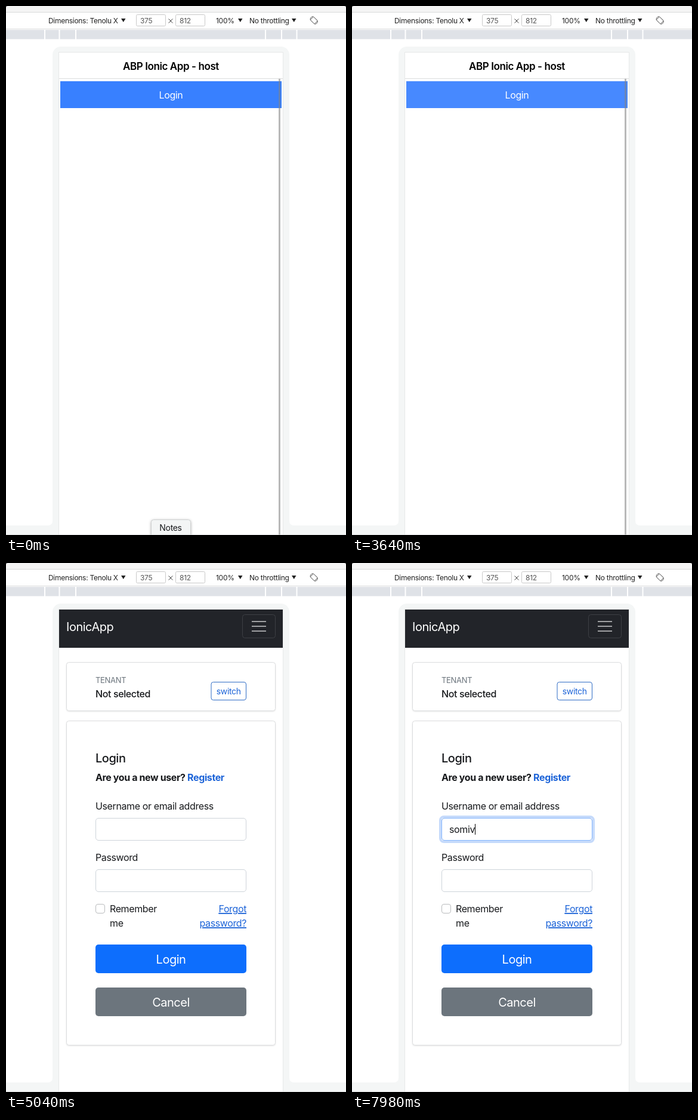
Recreate the animation shown at these times as an HTML page. Size 570 by 886 pixels, loop 8000 ms.

```html
<!DOCTYPE html>
<html lang="en">
<head>
<meta charset="utf-8">
<title>Mobile login</title>
<style>
html, body { margin: 0; width: 100%; height: 100%; overflow: hidden; background: #fff; }
svg { display: block; }
text { font-family: Inter, "Liberation Sans", sans-serif; font-size: 16px; letter-spacing: -.024em; fill: #17191c; }
.ui { font-size: 12px; fill: #222; }
.mid { text-anchor: middle; }
.end { text-anchor: end; }
.white { fill: #fff; }
.big { font-size: 20px; }
.link { fill: #1d64d8; }
.bold { font-weight: 700; }
.field { fill: #fff; stroke: #ced4da; }
.box { fill: #fff; stroke: #c9c9c9; }
.card { fill: #fff; stroke: #dcdddf; filter: drop-shadow(0 1px 1px rgba(0,0,0,.1)); }
.float { filter: drop-shadow(0 1px 2px rgba(0,0,0,.3)); }
.small { font-size: 13px; }
</style>
</head>
<body>
<svg width="570" height="886" viewBox="0 0 570 886">
  <rect width="570" height="886" fill="#fff"/>

  <!-- browser toolbar -->
  <rect width="570" height="10" fill="#f5f5f5"/>
  <path d="M0 10.5H570M0 38.5H570" stroke="#d9dadb"/>
  <path d="M0 0h3q-3 0-3 3z" fill="#444"/>
  <path d="M570 0h-3q3 0 3 3z" fill="#444"/>
  <rect y="40" width="570" height="15.5" fill="#dfe2e7"/>
  <path d="M65 40v16M89.500 40v16M117 40v16M435 40v16M462 40v16M487.500 40v16" stroke="#fff" stroke-width="2"/>
  <text class="ui" x="71" y="28.500">Dimensions: Tenolu X</text>
  <rect class="box" x="218.500" y="14.500" width="49" height="19" rx="2"/>
  <rect class="box" x="284.500" y="14.500" width="49" height="19" rx="2"/>
  <text class="ui" x="225" y="28.500" style="fill:#555">375</text>
  <text class="ui" x="291" y="28.500" style="fill:#555">812</text>
  <path d="M272.500 21.500l7 7m0-7l-7 7" stroke="#444"/>
  <text class="ui" x="352" y="28.500">100%</text>
  <text class="ui" x="408" y="28.500">No throttling</text>
  <path d="M193 21h7.500l-3.750 6zM389 21h7.500l-3.750 6zM479 21h7.500l-3.750 6z" fill="#222"/>
  <g fill="none" stroke="#6b6b6b">
    <rect x="512.500" y="19" width="7.500" height="10" rx="1" transform="rotate(-45 516.250 24)"/>
    <path d="M510 23q0-5 5-5.500M522.500 25q0 5-5 5.500"/>
  </g>

  <!-- device frame -->
  <g fill="#f4f6f6">
    <rect y="870" width="570" height="16"/>
    <rect x="78" y="68" width="397" height="840" rx="14"/>
    <path d="M78 862v8h-8q8 0 8-8zM475 862v8h8q-8 0-8-8z"/>
  </g>
  <rect x="88" y="77" width="377" height="809" fill="#e6e8e8"/>
  <rect x="89" y="78" width="375" height="808" fill="#fff"/>

  <g id="home">
    <text class="mid" x="276.500" y="106.500" style="font-size:17px;font-weight:600;fill:#000">ABP Ionic App - host</text>
    <path d="M89 121.500H464" stroke="#dcdddd"/>
    <rect x="91" y="126" width="371" height="45" fill="#3880ff"/>
    <rect id="hover" x="91" y="126" width="371" height="45" fill="#4e8eff"/>
    <text class="mid white" x="276.500" y="154.500">Login</text>
    <rect x="457" y="122" width="3" height="764" fill="#808080" opacity=".55"/>
    <g id="tip">
      <rect class="float" x="243.500" y="860.500" width="66" height="30" rx="4" fill="#f3f5f5" stroke="#d0d2d2"/>
      <text class="mid" x="276" y="878.500" style="font-size:14px">Notes</text>
    </g>
  </g>

  <g id="login">
    <rect x="89" y="78" width="375" height="64" fill="#222429"/>
    <text class="big white" x="101" y="113.500">IonicApp</text>
    <rect x="396.500" y="86.500" width="55" height="39" rx="4" fill="none" stroke="#3d3f44"/>
    <path d="M412 98h24M412 106h24M412 114h24" stroke="#a0a1a3" stroke-width="2"/>

    <rect class="card" x="101.500" y="166.500" width="350" height="81" rx="4"/>
    <text class="small" x="150" y="201" style="fill:#6c757d">TENANT</text>
    <text x="150" y="225" style="font-weight:500">Not selected</text>
    <rect x="344" y="199.500" width="58.500" height="30" rx="3.500" fill="#fff" stroke="#2f6cc5"/>
    <text class="mid link" x="373.200" y="219.500" style="font-size:14px">switch</text>

    <rect class="card" x="101.500" y="264.500" width="350" height="543" rx="4"/>
    <text class="big" x="150" y="334" style="font-weight:500">Login</text>
    <text class="bold" x="150" y="365">Are you a new user? <tspan class="link">Register</tspan></text>
    <text x="150" y="413">Username or email address</text>
    <rect class="field" x="150.500" y="427.500" width="252" height="37" rx="4.500"/>
    <g id="ring" fill="none">
      <rect x="148" y="425" width="257" height="42" rx="6" stroke="#c5dafb" stroke-width="4"/>
      <rect x="150.500" y="427.500" width="252" height="37" rx="4.500" stroke="#86b7fe"/>
    </g>
    <text id="typed" x="163" y="452"></text>
    <rect id="caret" y="437" width="1" height="18" fill="#000"/>
    <text x="150" y="499">Password</text>
    <rect class="field" x="150.500" y="513.500" width="252" height="37" rx="4.500"/>
    <rect class="field" x="150.500" y="571.500" width="15" height="15" rx="3.500" style="stroke:#b9bbbd"/>
    <text x="174" y="585">Remember</text>
    <text x="174" y="609">me</text>
    <g text-decoration="underline" style="fill:#1d64d8">
      <text class="end link" x="403" y="585" text-decoration="underline">Forgot</text>
      <text class="end link" x="403" y="609" text-decoration="underline">password?</text>
    </g>
    <rect x="150" y="639" width="253" height="48" rx="5" fill="#0d6efd"/>
    <text class="big mid white" x="276.500" y="670.500">Login</text>
    <rect x="150" y="711" width="253" height="48" rx="5" fill="#6c757d"/>
    <text class="big mid white" x="276.500" y="742.500">Cancel</text>

    <g id="popup">
      <g class="float" fill="#fff">
        <path d="M261 475l9.500-9 9.500 9z"/>
        <rect id="list" x="249" y="474" width="96" height="80" rx="3"/>
      </g>
      <text class="small" x="261" y="501">somiv</text>
      <text class="small" id="second" x="261" y="537">tarnelop</text>
    </g>
  </g>
  <path d="M0 885.500H570" stroke="#d5d7d8" opacity=".7"/>
</svg>
<script>
const LOOP = 8000, STEP = 70;
const USER = 'somiv';
const KEYS = [7070, 7280, 7630, 7840, 7980];
const HOVER = [[3360, 0], [3570, 1], [3780, 0], [4270, 0], [4410, 1]];

const $ = id => document.getElementById(id);
const [home, login, hover, tip, ring, typed, caret, popup, list, second] =
  ['home', 'login', 'hover', 'tip', 'ring', 'typed', 'caret', 'popup', 'list', 'second'].map($);

const ramp = (t, from, to) => Math.min(1, Math.max(0, (t - from) / (to - from)));
const show = (el, on) => el.setAttribute('visibility', on ? 'inherit' : 'hidden');

function along(keys, t) {
  let value = keys[0][1];
  for (let i = 1; i < keys.length; i++) {
    const [t0, v0] = keys[i - 1], [t1, v1] = keys[i];
    if (t >= t0) value = v0 + (v1 - v0) * ramp(t, t0, t1);
  }
  return value;
}

function draw(time) {
  const t = Math.floor(time % LOOP / STEP) * STEP;
  const count = KEYS.filter(k => t >= k).length;

  show(home, t < 5040);
  show(login, t >= 5040);
  tip.setAttribute('opacity', 1 - ramp(t, 0, 350));
  hover.setAttribute('opacity', along(HOVER, t));

  ring.setAttribute('opacity', ramp(t, 6440, 6650));
  typed.textContent = USER.slice(0, count);
  caret.setAttribute('x', 163 + (count ? Math.round(typed.getComputedTextLength()) : 0));
  show(caret, t >= 6510 && (t < 7000 || count > 0));

  show(popup, t >= 6580 && t < 7980);
  list.setAttribute('height', t < 7140 ? 80 : 44);
  show(second, t < 7140);
}

function tick(now) {
  draw(now);
  requestAnimationFrame(tick);
}
draw(0);
requestAnimationFrame(tick);
</script>
</body>
</html>
```
